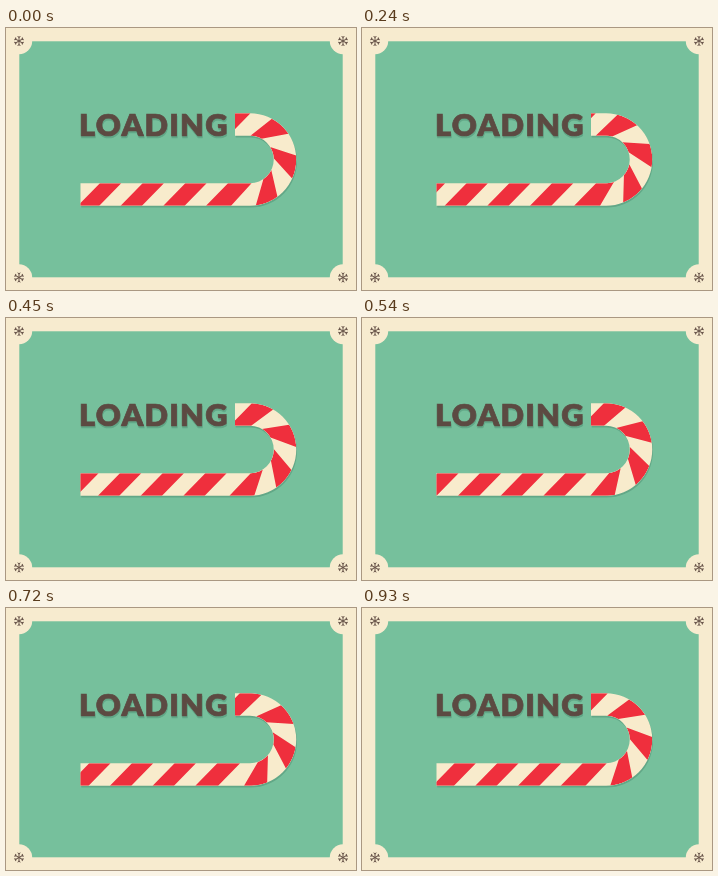
An HTML page that plays this animation: 350 by 262 pixels, repeating every 960 ms.

```html
<!DOCTYPE html>
<html lang="en">
<head>
<meta charset="utf-8">
<title>Loading</title>
<style>
html, body { margin: 0; width: 100%; height: 100%; overflow: hidden; background: #f7ebcf; }
svg { display: block; width: 100vw; height: 100vh; }
text { font: 900 30.8px Lato, sans-serif; letter-spacing: 1.25px; fill: currentColor; stroke: currentColor; stroke-width: .7px; }
</style>
</head>
<body>
<svg viewBox="0 0 350 262">
  <defs>
    <path id="cane" d="M74.5 155.25H244A23.75 23.75 0 0 0 244 107.75H229V85.25H244A46.25 46.25 0 0 1 244 177.75H74.5Z"/>
    <clipPath id="clip"><use href="#cane"/></clipPath>
    <path id="arm" d="M0 0V-4.7M-1.3 -4.8L0 -3.3L1.3 -4.8"/>
    <g id="flake" fill="none" stroke="#6b574c"></g>
    <text id="word" x="73" y="107.7">LOADING</text>
  </defs>
  <rect width="350" height="262" fill="#f7ebcf"/>
  <rect x="13.3" y="13.3" width="323.4" height="236" fill="#76c09c"/>
  <g id="corners"></g>
  <use href="#word" x=".5" y="2.4" color="#62a787"/>
  <use href="#cane" x=".7" y="1.8" fill="#62a787"/>
  <use href="#word" color="#5c4a42"/>
  <use href="#cane" fill="#f8ebcc"/>
  <path id="stripes" fill="#ef2f3d" clip-path="url(#clip)"/>
</svg>
<script>
const LOOP = 960, STEP = 30;
const PERIOD = 42.7, WIDTH = PERIOD / 2, LEAD = 22, START = 71.9;
const CX = 244, CY = 131.5, OUTER = 46.25, INNER = 23.75;
const ARC = Math.PI * OUTER;
// Even travel -> distance along the outer edge; stripes spread out in the bend
const PACE = [[204, 204], [232, 238], [328, 344], [370, 388]];
const byId = id => document.getElementById(id);

byId('flake').innerHTML = [0, 60, 120, 180, 240, 300]
  .map(a => `<use href="#arm" transform="rotate(${a})"/>`).join('');
byId('corners').innerHTML = [[13, 13], [337, 13], [13, 249.5], [337, 249.5]]
  .map(([x, y]) => `<circle cx="${x}" cy="${y}" r="13.2" fill="#f7ebcf"/>` +
    `<use href="#flake" x="${x}" y="${y}"/>`).join('');

function pace(u) {
  if (u < PACE[0][0]) return u;
  for (let i = 1; i < PACE.length; i++) {
    const [u0, s0] = PACE[i - 1], [u1, s1] = PACE[i];
    if (u < u1) return s0 + (s1 - s0) * (u - u0) / (u1 - u0);
  }
  const [u0, s0] = PACE[PACE.length - 1];
  return s0 + u - u0;
}

// Point on one edge of the cane, measured along the outer edge
function point(s, r) {
  const d = s - CX;
  if (d < 0) return [s, CY + r];
  if (d > ARC) return [CX - (d - ARC), CY - r];
  const a = d / OUTER;
  return [CX + r * Math.sin(a), CY + r * Math.cos(a)];
}

function stripe(u) {
  const pts = [], n = 12;
  for (let i = 0; i <= n; i++) pts.push(point(pace(u + WIDTH * i / n), OUTER));
  for (let i = n; i >= 0; i--) pts.push(point(pace(u + WIDTH * i / n) + LEAD, INNER));
  return 'M' + pts.map(p => p.map(v => v.toFixed(2)).join(' ')).join('L') + 'Z';
}

function draw(now) {
  const t = Math.floor((now % LOOP) / STEP) * STEP;
  let d = '';
  for (let k = -2; k < 9; k++) d += stripe(START + PERIOD * (k + t / LOOP));
  byId('stripes').setAttribute('d', d);
}

const begin = performance.now();
function tick() {
  draw(performance.now() - begin);
  requestAnimationFrame(tick);
}
tick();
</script>
</body>
</html>
```
